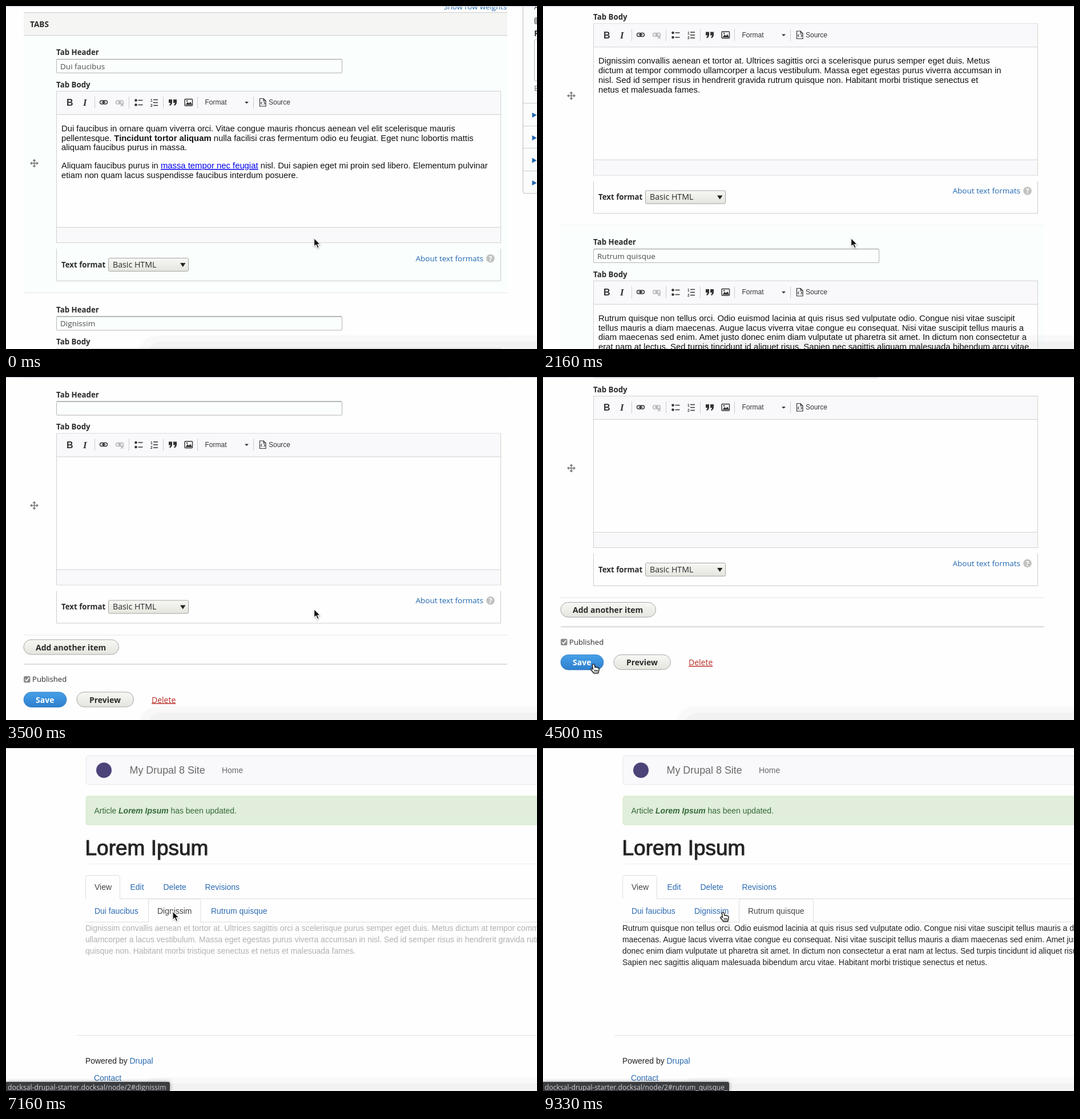
Animation, 930 px wide and 602 px high, one loop 9500 ms. Source, as an HTML page:

```html
<!DOCTYPE html>
<html lang="en">
<head>
<meta charset="utf-8">
<title>Tabs demo</title>
<style>
html, body { margin: 0; width: 100%; height: 100%; overflow: hidden; background: #fefefe; }
svg { display: block; width: 930px; height: 602px; }
.ui { font: 13.3px "Open Sans", "Noto Sans", sans-serif; fill: #2b2b2b; }
.body { font: 14.83px "Liberation Sans", Arial, sans-serif; fill: #111; }
.view { font: 13.95px "Liberation Sans", Arial, sans-serif; fill: #222; }
.tool { font: 12px "Liberation Sans", Arial, sans-serif; fill: #333; }
.field { font-size: 13.5px; fill: #4c4c4c; }
.btn { font-size: 14px; }
.b { font-weight: 700; }
.i { font-style: italic; }
.u { fill: #00e; text-decoration: underline; }
.link { fill: #1f66b0; }
.a { fill: #2b6bb2; }
.on { fill: #444; }
.over { fill: #23527c; }
.line { fill: none; stroke: #ccc; }
.ico { fill: none; stroke: #333; stroke-width: 1.4; }
#bar { filter: drop-shadow(0 0 3px #0006); }
#cursor { filter: drop-shadow(0 1px 1px #0005); }
</style>
</head>
<body>
<svg viewBox="0 0 930 602">
  <defs>
    <linearGradient id="grey" x2="0" y2="1"><stop stop-color="#f7f7f4"/><stop offset="1" stop-color="#e5e5df"/></linearGradient>
    <linearGradient id="blue" x2="0" y2="1"><stop stop-color="#46a0e8"/><stop offset="1" stop-color="#2f7fcd"/></linearGradient>

    <g id="chain">
      <rect x="-6.5" y="-3" width="7.5" height="6" rx="3"/>
      <rect x="-1" y="-3" width="7.5" height="6" rx="3"/>
      <path d="M-3.5 0h7"/>
    </g>

    <!-- One field group: header input, editor, text format -->
    <g id="item">
      <path class="line" style="stroke:#e1e5e3" d="M31 503.500H878"/>
      <path d="M49.500 270v12M43.500 276h12" stroke="#777" stroke-width="1.500"/>
      <path d="M49.500 268.500l3 3.500h-6zM49.500 283.500l3-3.500h-6zM42 276l3.500-3v6zM57 276l-3.500-3v6z" fill="#777"/>
      <g class="ui">
        <text class="b" x="88" y="86">Tab Header</text>
        <rect x="88.500" y="93.500" width="500" height="24" rx="1.500" fill="#fafefd" stroke="#b5b5b5"/>
        <path class="line" style="stroke:#959595" d="M89 93.500h499"/>
        <text class="b" x="88" y="142.500">Tab Body</text>
        <path class="line" d="M88.500 426V482.500H866.500V426"/>
        <text class="b" x="97" y="458.500" font-size="13.250">Text format</text>
        <rect x="179.500" y="442.500" width="140" height="23" rx="2" fill="url(#grey)" stroke="#a5a5a5"/>
        <text x="187" y="458.500" font-size="14.200">Basic HTML</text>
        <path d="M305 451h9.500l-4.750 7z" fill="#222"/>
        <text class="link" x="717.500" y="447.500" font-size="13.500">About text formats</text>
        <circle cx="848.500" cy="443" r="7.300" fill="#c2c2c0"/>
        <text class="b" x="848.500" y="447.500" font-size="12" text-anchor="middle" style="fill:#fff">?</text>
      </g>
      <rect x="88.500" y="149.500" width="778" height="266" fill="#fefefe" stroke="#d1d1d1"/>
      <path d="M89 150h777v40H89zM89 389h777v26H89z" fill="#f9f9fc"/>
      <path class="line" style="stroke:#d1d1d1" d="M89 190.500h777M89 388.500h777"/>
      <path class="line" d="M155.500 159v21M215.500 159v21M275.500 159v21M335.500 159v21M433.500 159v21"/>
      <g class="tool">
        <text class="b" x="106" y="175" font-size="16">B</text>
        <text class="b i" x="135" y="175" font-size="17" font-family="Liberation Serif, serif">I</text>
        <use href="#chain" class="ico" x="171" y="169"/>
        <g class="ico" opacity=".35"><use href="#chain" x="199" y="169"/><path d="M201 171l5 5M206 171l-5 5"/></g>
        <path class="ico" d="M231.500 165.500h8M231.500 173.500h8M258 164.500h8M258 169.500h8M258 174.500h8"/>
        <circle cx="227.500" cy="165.500" r="2.300"/><circle cx="227.500" cy="173.500" r="2.300"/>
        <text class="b" x="253" y="168" font-size="6.500">1</text>
        <text class="b" x="253" y="176.500" font-size="6.500">2</text>
        <path d="M285 164h6v5q0 4-4 6l-1-1.500q2-1.500 2-3.500h-3zM293 164h6v5q0 4-4 6l-1-1.500q2-1.500 2-3.500h-3z"/>
        <rect class="ico" x="313" y="163.500" width="13.500" height="11.500" rx="1"/>
        <path d="M314.500 173.500l3.500-5 2.500 2.500 2.500-3 3 5.500z"/><circle cx="317" cy="166.500" r="1.200"/>
        <text x="348.500" y="173">Format</text>
        <path d="M418 168h7l-3.500 3.500z"/>
        <path class="ico" style="stroke-width:1.200" d="M444.500 162.500h6.500l4 4v9.500h-10.500zM451 162.500v4h4M448.500 168l-2 2.500 2 2.500M451.500 168l2 2.500-2 2.500"/>
        <text x="460" y="173">Source</text>
      </g>
    </g>

    <path id="arrow" d="M0 0V15L3.500 12 6 17.800 8.700 16.600 6.300 11H11Z" fill="#111" stroke="#fff" stroke-width="1.200"/>
    <path id="hand" d="M0 0q1.500-.5 2 1l1 4.500 1.500-.5 1 .8 1.500-.4 1 1 1.500.1q1 3 0 5.500l-1 3.500H1L-4 9.500q0-2 2-1.500l1.500 1L-1.500 2Q-1.500.300 0 0zM2.500 10v3M4.800 10v3M7 10v3" fill="#fff" stroke="#222" stroke-width="1.400"/>
    <path id="beam" d="M-3.500-6Q0-6 0-4Q0-6 3.500-6M0-4V5M-3.500 7Q0 7 0 5Q0 7 3.500 7M-2 2h4" fill="none" stroke="#666" stroke-width="1.200"/>
  </defs>

  <rect width="930" height="602" fill="#fefefe"/>

  <g id="form">
    <g class="ui">
      <text class="link" x="766.500" y="6" font-size="13.200">Show row weights</text>
      <path d="M31 11.500H878V51.500H31z" fill="#f5f5f3"/>
      <path class="line" d="M31 11.500H878M31 51.500H878"/>
      <text class="b" x="42" y="37" font-size="13.600">TABS</text>
    </g>
    <g class="ui">
      <path d="M940-20H905.500V325q0 4 4 4H940" fill="#fbfcfc" stroke="#bbb"/>
      <path class="line" d="M906 170.500h24M906 210.500h24M906 249.500h24M906 289.500h24"/>
      <path class="link" d="M921.500 187l8 4.500-8 4.500zM921.500 227l8 4.500-8 4.500zM921.500 266.500l8 4.500-8 4.500zM921.500 306l8 4.500-8 4.500z"/>
      <text x="925" y="6">A</text>
      <rect x="925.500" y="20.500" width="11" height="11" rx="2" fill="#aaa" stroke="#888"/>
      <text class="b" x="925" y="53">R</text>
      <rect x="925.500" y="59.500" width="40" height="72" rx="1" fill="#fdfefe" stroke="#b5b5b5"/>
      <text x="925" y="149" font-size="12" fill="#666">B</text>
    </g>
    <g id="items"></g>
    <g class="ui" transform="translate(0 1470.5)">
      <rect x="31" y="395.500" width="166.500" height="26" rx="13" fill="url(#grey)" stroke="#a6a6a6"/>
      <text class="b btn" x="52" y="414">Add another item</text>
      <path class="line" style="stroke:#bbb" d="M31 438.500H878"/>
      <rect x="31" y="459.500" width="11.500" height="11.500" rx="2.500" fill="#8c8c8c"/>
      <path d="M33.500 465.500l2.500 2.500 4.500-6" fill="none" stroke="#fff" stroke-width="1.700"/>
      <text x="46" y="469.500" font-size="13.100">Published</text>
      <rect x="31" y="487.500" width="75" height="26.500" rx="13.250" fill="url(#blue)" stroke="#2d78bf" stroke-width=".8"/>
      <text class="b btn" x="52" y="506" style="fill:#fff">Save</text>
      <rect x="124" y="487.500" width="99.500" height="26" rx="13" fill="url(#grey)" stroke="#a6a6a6"/>
      <text class="b btn" x="146" y="506">Preview</text>
      <text class="btn" x="255" y="506" style="fill:#b92b23;text-decoration:underline">Delete</text>
    </g>
  </g>

  <g id="page" class="view">
    <rect x="140" y="13.500" width="820" height="50.500" rx="4" fill="#f9f9fc" stroke="#e6e6ea"/>
    <circle cx="171.500" cy="39" r="13.500" fill="#4c4478"/>
    <text x="216.500" y="45" font-size="17.900" fill="#6a6a6a">My Drupal 8 Site</text>
    <text x="378" y="44" fill="#6a6a6a">Home</text>
    <rect x="140" y="84.500" width="820" height="50.500" rx="4" fill="#e0eedb" stroke="#d6e8c8"/>
    <text x="154.500" y="115" fill="#34693a">Article <tspan class="b i">Lorem Ipsum</tspan> has been updated.</text>
    <text x="138.500" y="188" font-size="37" stroke="#2b2b2b" stroke-width="1.100">Lorem Ipsum</text>
    <path class="line" style="stroke:#eee" d="M139 203.500H930"/>
    <path class="line" style="stroke:#ddd" d="M139.500 264.500V227.500q0-4 4-4h52q4 0 4 4V264.500H930"/>
    <text class="on" x="155" y="249">View</text>
    <text class="a" x="217.500" y="249">Edit</text>
    <text class="a" x="275.500" y="249">Delete</text>
    <text class="a" x="348.500" y="249">Revisions</text>
    <path class="line" style="stroke:#ddd" d="M139 305.500H930"/>
    <g id="tabs"></g>
    <g id="panes"></g>
    <path class="line" style="stroke:#e3e3e3" d="M125 504.500H930"/>
    <text x="139" y="554">Powered by <tspan class="a">Drupal</tspan></text>
    <text class="a" x="154" y="584">Contact</text>
  </g>

  <rect width="930" height="1.500" fill="#dadae4"/>
  <g fill="#22223a" opacity=".022">
    <rect x="232" y="578" width="800" height="80" rx="34"/>
  </g>
  <rect x="246" y="589" width="800" height="80" rx="26" fill="#22223a" opacity=".028"/>

  <g id="status">
    <path id="bar" fill="#3b3d41"/>
    <text id="url" class="ui" x="3" y="600.300" style="font-size:12.150px;fill:#cfcfcf"></text>
  </g>
  <use id="cursor"/>
</svg>
<script>
const $ = id => document.getElementById(id);
const STEP = 1000 / 6, STEPS = 57, PITCH = 451.5;

const lines = (cls, x, y, dy, rows) =>
  rows.map((row, i) => `<text class="${cls}" x="${x}" y="${y + i * dy}">${row}</text>`).join('');

const edit = (y, ...rows) => lines('body', 97, y, 16.8, rows);
const pane = (y, ...rows) => lines('', 139, y, 19.8, rows);

const items = [
  ['Dui faucibus',
    edit(219.7, 'Dui faucibus in ornare quam viverra orci. Vitae congue mauris rhoncus aenean vel elit scelerisque mauris',
      'pellentesque. <tspan class="b">Tincidunt tortor aliquam</tspan> nulla facilisi cras fermentum odio eu feugiat. Eget nunc lobortis mattis',
      'aliquam faucibus purus in massa.') +
    edit(285, 'Aliquam faucibus purus in <tspan class="u">massa tempor nec feugiat</tspan> nisl. Dui sapien eget mi proin sed libero. Elementum pulvinar',
      'etiam non quam lacus suspendisse faucibus interdum posuere.')],
  ['Dignissim',
    edit(219.7, 'Dignissim convallis aenean et tortor at. Ultrices sagittis orci a scelerisque purus semper eget duis. Metus',
      'dictum at tempor commodo ullamcorper a lacus vestibulum. Massa eget egestas purus viverra accumsan in',
      'nisl. Sed id semper risus in hendrerit gravida rutrum quisque non. Habitant morbi tristique senectus et',
      'netus et malesuada fames.')],
  ['Rutrum quisque',
    edit(219.7, 'Rutrum quisque non tellus orci. Odio euismod lacinia at quis risus sed vulputate odio. Congue nisi vitae suscipit',
      'tellus mauris a diam maecenas. Augue lacus viverra vitae congue eu consequat. Nisi vitae suscipit tellus mauris a',
      'diam maecenas sed enim. Amet justo donec enim diam vulputate ut pharetra sit amet. In dictum non consectetur a',
      'erat nam at lectus. Sed turpis tincidunt id aliquet risus. Sapien nec sagittis aliquam malesuada bibendum arcu vitae.',
      'Habitant morbi tristique senectus et netus.')],
  ['', '']
];
$('items').innerHTML = items.map(([title, text], i) => `<g transform="translate(0 ${i * PITCH})">
  ${i % 2 ? '' : '<path d="M31 52H878V503H31z" fill="#fafefd"/>'}
  <use href="#item"/><text class="ui field" x="95" y="110.500">${title}</text>${text}</g>`).join('');

const panes = [
  pane(321.3, 'Dui faucibus in ornare quam viverra orci. Vitae congue mauris rhoncus aenean vel elit scelerisque mauris pellentesque. <tspan class="b">Tincidunt tortor</tspan>',
    '<tspan class="b">aliquam</tspan> nulla facilisi cras fermentum odio eu feugiat. Eget nunc lobortis mattis aliquam faucibus purus in massa.') +
  pane(370.8, 'Aliquam faucibus purus in <tspan class="a">massa tempor nec feugiat</tspan> nisl. Dui sapien eget mi proin sed libero. Elementum pulvinar etiam non quam',
    'lacus suspendisse faucibus interdum posuere.'),
  pane(321.3, 'Dignissim convallis aenean et tortor at. Ultrices sagittis orci a scelerisque purus semper eget duis. Metus dictum at tempor commodo',
    'ullamcorper a lacus vestibulum. Massa eget egestas purus viverra accumsan in nisl. Sed id semper risus in hendrerit gravida rutrum',
    'quisque non. Habitant morbi tristique senectus et netus et malesuada fames.'),
  pane(321.3, 'Rutrum quisque non tellus orci. Odio euismod lacinia at quis risus sed vulputate odio. Congue nisi vitae suscipit tellus mauris a diam',
    'maecenas. Augue lacus viverra vitae congue eu consequat. Nisi vitae suscipit tellus mauris a diam maecenas sed enim. Amet justo',
    'donec enim diam vulputate ut pharetra sit amet. In dictum non consectetur a erat nam at lectus. Sed turpis tincidunt id aliquet risus.',
    'Sapien nec sagittis aliquam malesuada bibendum arcu vitae. Habitant morbi tristique senectus et netus.')
];
$('panes').innerHTML = panes.map(p => `<g>${p}</g>`).join('');

// Left edge and width of each tab
const tabs = [[139.5, 108], [249.5, 91.5], [343.5, 130]];
$('tabs').innerHTML = tabs.map(([x, w], i) =>
  `<path d="M${x} 306V269q0-4 4-4h${w - 8}q4 0 4 4V306"/><text x="${x + 15.5}" y="291">${items[i][0]}</text>`).join('');

// Each entry starts at its step and holds until the next one
const scrolls = [[0, 0], [11, 1], [12, 190], [13, 570], [14, 880], [15, 1032], [17, 1034.5],
  [18, 1095], [19, 1210], [20, 1325], [21, 1405], [22, 1454], [23, 1470.5]];
const moves = [[0, 'arrow', 539.5, 407.3], [24, 'arrow', 440, 425], [25, 'arrow', 240, 472], [26, 'arrow', 108, 503],
  [27, 'hand', 88, 504], [30, 'arrow', 88, 504], [32, 'arrow', 105, 490], [33, 'arrow', 160, 434],
  [34, 'arrow', 222, 372], [35, 'beam', 278, 320], [36, 'hand', 330, 294], [37, 'hand', 380, 288],
  [38, 'hand', 293, 288], [42, 'arrow', 292, 286.5], [45, 'arrow', 302, 287], [46, 'arrow', 328, 287],
  [47, 'hand', 358, 287], [48, 'hand', 372, 286], [49, 'arrow', 372.5, 286], [56, 'hand', 315, 288.5]];
const hovers = [[0, -1], [36, 1], [37, 2], [38, 1], [42, -1], [47, 2], [49, -1]];
const fades = [[0, 0, 1], [42, 0, .35], [43, 1, .35], [44, 1, 1], [49, 1, .35], [50, 2, .35], [51, 2, 1]];
const at = (list, n) => list.findLast(e => e[0] <= n).slice(1);

function draw(n) {
  const viewing = n >= 30;
  $('form').style.display = viewing ? 'none' : '';
  $('page').style.display = viewing ? '' : 'none';
  $('form').setAttribute('transform', `translate(0 ${-at(scrolls, n)[0]})`);

  const active = n < 42 ? -1 : n < 49 ? 1 : 2, [hover] = at(hovers, n), [shown, alpha] = at(fades, n);
  tabs.forEach((_, i) => {
    const [shape, label] = [...$('tabs').children].slice(i * 2, i * 2 + 2);
    const on = i === active, over = i === hover;
    shape.setAttribute('fill', on ? '#fefefe' : over ? '#eee' : 'none');
    shape.setAttribute('stroke', on ? '#ddd' : over ? '#eee' : 'none');
    label.setAttribute('class', on ? 'on' : over ? 'over' : 'a');
    $('panes').children[i].style.opacity = i === shown ? alpha : 0;
  });

  const late = n >= 48;
  $('status').style.opacity = n < 38 ? 0 : n < 39 ? .5 : 1;
  $('bar').setAttribute('d', `M0 586H${late ? 323 : 284}q3 0 3 3V602H0z`);
  $('url').textContent = 'docksal-drupal-starter.docksal/node/2#' + (late ? 'rutrum_quisque_' : 'dignissim');

  const [kind, x, y] = at(moves, n);
  $('cursor').setAttribute('href', '#' + kind);
  $('cursor').setAttribute('transform', `translate(${x} ${y})`);
}

const start = performance.now();
let last = -1;
function tick() {
  const n = Math.floor((performance.now() - start + 7) / STEP) % STEPS;
  if (n !== last) draw(last = n);
  requestAnimationFrame(tick);
}
tick();
</script>
</body>
</html>
```
